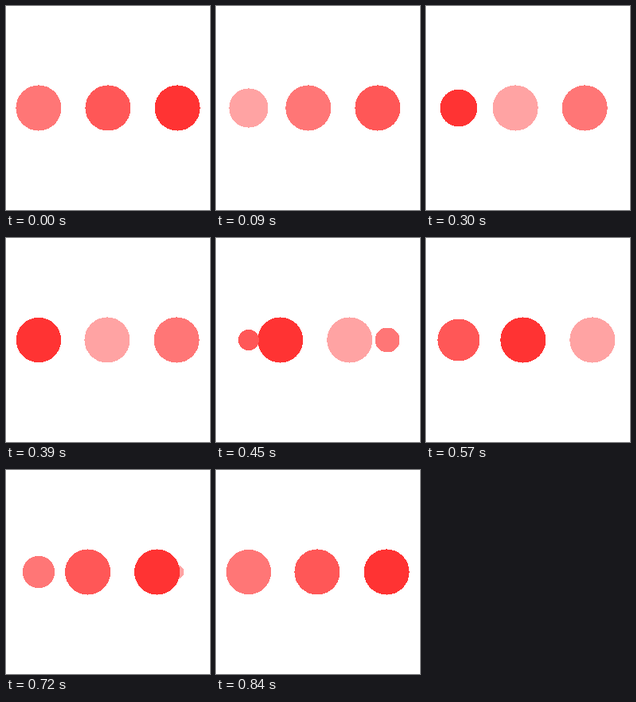
An HTML page for the animation above (870 ms loop, 256 by 256 pixels).

```html
<!DOCTYPE html>
<html lang="en">
<head>
<meta charset="utf-8">
<title>Dots loader</title>
<style>
  html, body { margin: 0; width: 100%; height: 100%; overflow: hidden; background: #fff; }
  svg { display: block; width: 100vw; height: 100vh; shape-rendering: crispEdges; }
</style>
</head>
<body>
<svg id="stage" viewBox="0 0 256 256"></svg>
<script>
  const TICK = 30, TICKS = 29, STEPS = 30;
  const LEFT = 40.96, GAP = 87.04, RIGHT = LEFT + 2 * GAP, RADIUS = 28.55;
  const COLORS = ['#ff3333', '#ffa3a3', '#ff7676', '#ff5757'];

  const stage = document.getElementById('stage');

  function addDot(fill) {
    const dot = document.createElementNS('http://www.w3.org/2000/svg', 'circle');
    dot.setAttribute('cy', 128);
    dot.setAttribute('fill', fill);
    return stage.appendChild(dot);
  }

  function place(dot, x, r) {
    dot.setAttribute('cx', x);
    dot.setAttribute('r', r);
  }

  // cubic-bezier(0, .5, .5, 1)
  function ease(x) {
    let lo = 0, hi = 1;
    for (let i = 0; i < 30; i++) {
      const mid = (lo + hi) / 2;
      if (mid * mid * (1.5 - 0.5 * mid) < x) lo = mid; else hi = mid;
    }
    const t = hi, u = 1 - t;
    return x <= 0 ? 0 : 1.5 * u * u * t + 3 * u * t * t + t * t * t;
  }

  const leaving = addDot(COLORS[0]);
  const dots = COLORS.map(addDot);

  function draw(ms) {
    const tick = Math.floor((ms + 0.01) / TICK) % TICKS;
    // The loop jumps over its first step
    const step = tick ? tick + 1 : 0;
    const phase = step * 4 / STEPS;
    const quarter = Math.floor(phase);
    const p = ease(phase - quarter);

    leaving.setAttribute('fill', COLORS[(4 - quarter) % 4]);
    place(leaving, RIGHT, RADIUS * (1 - p));

    dots.forEach((dot, i) => {
      const stageNo = (quarter + i) % 4;
      if (stageNo === 0) place(dot, LEFT, 0);
      else if (stageNo === 1) place(dot, LEFT, RADIUS * p);
      else place(dot, LEFT + GAP * (stageNo - 2 + p), RADIUS);
    });
  }

  function loop() {
    draw(performance.now());
    requestAnimationFrame(loop);
  }
  loop();
</script>
</body>
</html>
```
